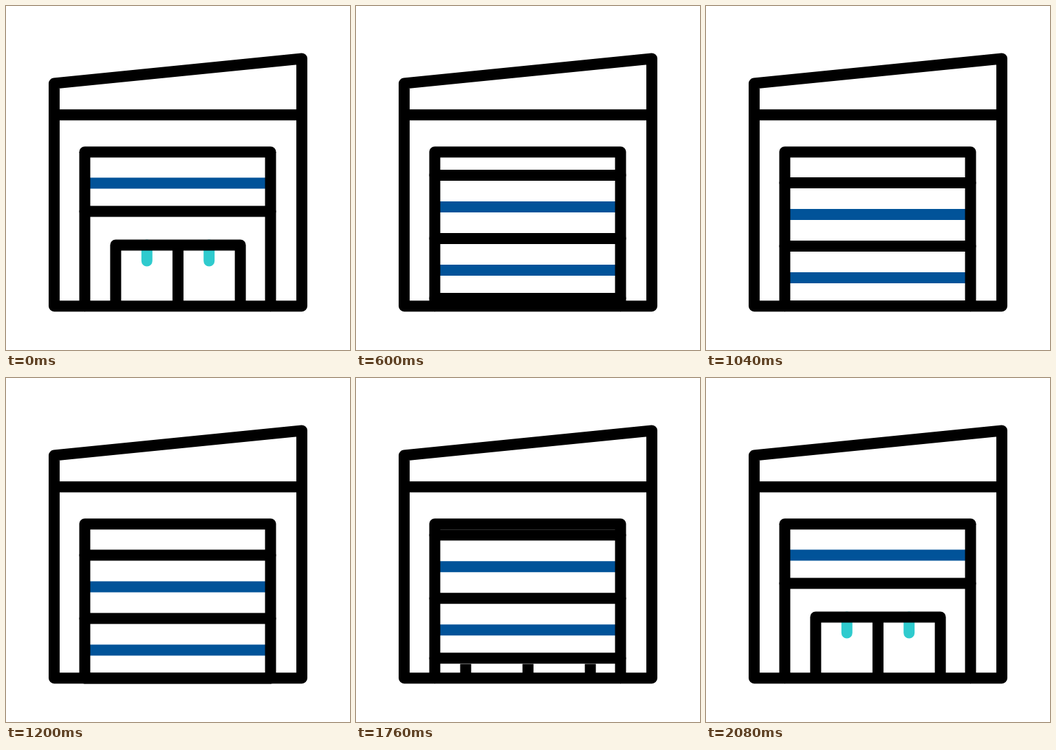
These frames come from a looping animation (500 by 500 pixels, 3000 ms). An HTML page:

```html
<!DOCTYPE html>
<html lang="en">
<head>
<meta charset="utf-8">
<title>Warehouse shutter</title>
<style>
  html, body { margin: 0; width: 100%; height: 100%; overflow: hidden; background: #fff; }
  svg { display: block; width: 100%; height: 100%; }
  .line { fill: none; stroke: #000; stroke-width: 16; stroke-linecap: round; stroke-linejoin: round; }
  .teal { stroke: #2fcbce; }
  .blue { stroke: #015399; stroke-linecap: butt; }
</style>
</head>
<body>
<svg viewBox="0 0 500 500">
  <clipPath id="opening"><rect x="106" y="212" width="288" height="234"/></clipPath>

  <g class="line">
    <path class="teal" d="M204.8 347.5V370.5M295.2 347.5V370.5"/>
    <path d="M159.4 436V347.5H340.6V436M250 347.5V436"/>
  </g>

  <g clip-path="url(#opening)">
    <g id="shutter">
      <rect x="122" y="100" width="255" height="206.8" fill="#fff"/>
      <g class="line">
        <path class="blue" d="M114.5 165.5H384.5M114.5 257.5H384.5"/>
        <path d="M114.5 119.5H384.5M114.5 211.5H384.5M114.5 298.5H384.5"/>
      </g>
    </g>
  </g>

  <g class="line">
    <path d="M70 112.5L430 76.5V436.2H70ZM70 158.2H430"/>
    <path d="M114.5 436.2V212.2H384.5V436.2"/>
  </g>
</svg>
<script>
  const LOOP = 3000, STEP = 40;
  const TRAVEL = 138;
  const DROP_AT = 320, FALL = 292.5, RESTITUTION = 0.487;
  const LIFT_AT = 1600, LIFT = 480;
  const shutter = document.getElementById('shutter');

  // Falls under gravity, then rebounds in ever smaller arcs.
  function drop(t) {
    const g = TRAVEL / (FALL * FALL);
    if (t < FALL) return g * t * t;
    t -= FALL;
    let span = 2 * FALL * RESTITUTION;
    while (t > span && span > 1) {
      t -= span;
      span *= RESTITUTION;
    }
    return TRAVEL - g * Math.max(0, t * (span - t));
  }

  function easeInOut(p) {
    const power = 2.12;
    return p < 0.5 ? (2 * p) ** power / 2 : 1 - (2 - 2 * p) ** power / 2;
  }

  function offset(t) {
    if (t < DROP_AT || t >= LIFT_AT + LIFT) return 0;
    if (t < LIFT_AT) return t < 1200 ? drop(t - DROP_AT) : TRAVEL;
    return TRAVEL * (1 - easeInOut((t - LIFT_AT) / LIFT));
  }

  function draw(now) {
    const t = Math.floor((now % LOOP) / STEP) * STEP;
    shutter.setAttribute('transform', `translate(0 ${offset(t).toFixed(2)})`);
  }

  const start = performance.now();
  function tick() {
    draw(performance.now() - start);
    requestAnimationFrame(tick);
  }
  tick();
</script>
</body>
</html>
```
